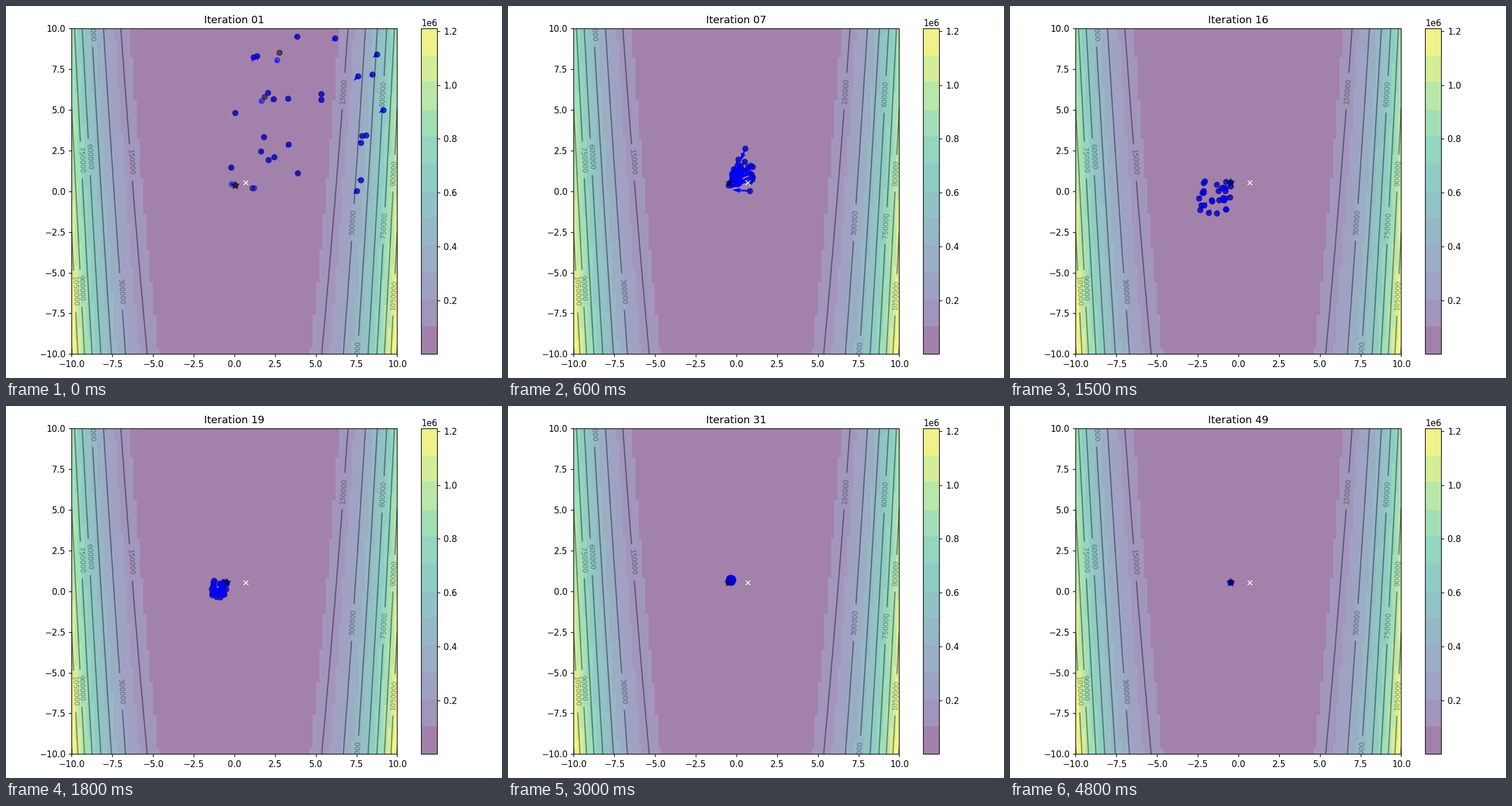
Write a matplotlib script that moves like this. It is 864 px wide and 648 px high and loops after 4.9 s.

```python
import numpy as np
import matplotlib.pyplot as plt
from matplotlib.animation import FuncAnimation
from matplotlib.colors import ListedColormap

W, H, DPI = 864, 648, 108
LIM = 10
PARTICLES, STEPS, BANDS = 30, 49, 12
INERTIA, C1, C2 = 0.8, 0.1, 0.1


def cost(x, y):
    return 100 * (y - x**2) ** 2 + (1 - x) ** 2


def run_swarm():
    """Return (positions, velocities, personal bests, leader) per step."""
    np.random.seed(100)
    pos = np.random.rand(2, PARTICLES) * 10
    vel = np.random.randn(2, PARTICLES) * 0.1
    best, limit = pos.copy(), cost(*pos)
    lead = best[:, limit.argmin()].copy()
    history = []
    for _ in range(STEPS + 1):
        r1, r2 = np.random.rand(2)
        vel = INERTIA * vel + C1 * r1 * (best - pos) + C2 * r2 * (lead[:, None] - pos)
        pos = pos + vel
        now = cost(*pos)
        accepted = limit >= now
        best[:, accepted] = pos[:, accepted]
        limit = np.maximum(limit, now)  # the bar only loosens
        lead = best[:, limit.argmin()].copy()
        history.append((pos, vel, best.copy(), lead))
    return history[1:]  # the first step is a warm-up


def banded_viridis():
    tones = (np.arange(BANDS) + 0.5) / BANDS
    tones[0] = 0.01
    return ListedColormap(plt.get_cmap("viridis")(tones[np.arange(256) * BANDS // 256]))


history = run_swarm()
axis = np.linspace(-LIM, LIM, 100)
x, y = np.meshgrid(axis, axis)
z = cost(x, y)
low = z.argmin()

fig, ax = plt.subplots(figsize=(W / DPI, H / DPI), dpi=DPI)
fig.set_layout_engine("tight")
fig.set_dpi(100)  # contour labels are laid out at the default resolution
img = ax.imshow(z, extent=[-LIM, LIM, -LIM, LIM], origin="lower",
                cmap=banded_viridis(), alpha=0.5)
fig.colorbar(img, ax=ax)
ax.plot([x.flat[low]], [y.flat[low]], marker="x", markersize=5, color="white")
lines = ax.contour(x, y, z, 10, colors="black", alpha=0.4)
ax.clabel(lines, inline=True, fontsize=8, fmt="%.0f")
fig.set_dpi(DPI)

pos, vel, best, lead = history[0]
best_dots = ax.scatter(*best, marker="o", color="black", alpha=0.5)
dots = ax.scatter(*pos, marker="o", color="blue", alpha=0.5)
arrows = ax.quiver(*pos, *vel, color="blue", width=0.005,
                   angles="xy", scale_units="xy", scale=1)
star = ax.scatter(*lead, marker="*", s=100, color="black", alpha=0.4)
ax.set_xlim(-LIM, LIM)
ax.set_ylim(-LIM, LIM)


def draw(i):
    pos, vel, best, lead = history[i]
    ax.set_title(f"Iteration {i + 1:02d}")
    best_dots.set_offsets(best.T)
    dots.set_offsets(pos.T)
    arrows.set_offsets(pos.T)
    arrows.set_UVC(*vel)
    star.set_offsets(lead[None])
    return best_dots, dots, arrows, star


anim = FuncAnimation(fig, draw, frames=STEPS, interval=100, repeat=True)
plt.show()
```
